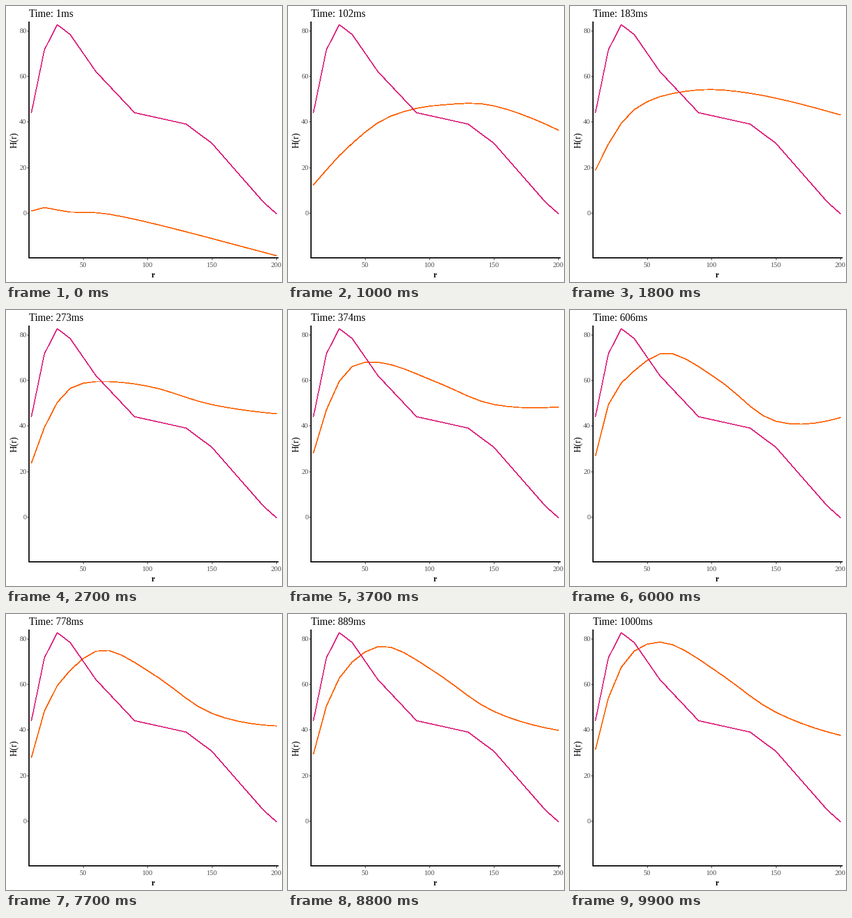
Animation, 480 px wide and 480 px high, one loop 10000 ms. Source, as a matplotlib script:

```python
import numpy as np
import matplotlib.pyplot as plt
from matplotlib.animation import FuncAnimation

SIZE, DPI = 480, 80
FRAMES, INTERVAL = 100, 100
PT = 72 / DPI
SERIF = "Liberation Serif"
PINK, ORANGE, GREY = "#dc267f", "#fe6100", "#4d4d4d"

R = np.arange(10, 201, 10)

# Bends of the fixed curve
REFERENCE = np.interp(R, [10, 20, 30, 40, 60, 90, 130, 150, 190, 200],
                      [44.2, 71.6, 82.6, 78.3, 62, 44, 39, 30.6, 4.8, -.25])

# Moving curve: H at a few radii (columns) and playback times (rows)
KEY_R = [10, 20, 40, 70, 110, 150, 200]
KEY_MS = np.array([0, 1000, 2700, 4600, 6000, 7700, 9900])
KEY_H = [[.9, 2.4, .4, -.5, -5.4, -11.2, -18.7],
         [12.4, 18.9, 30.5, 42.5, 47.4, 47, 36.4],
         [23.8, 39.3, 56.4, 59.4, 56.1, 49.3, 45.3],
         [29.6, 50.3, 69.1, 70.7, 58.8, 47.7, 48.3],
         [26.9, 49.3, 64.1, 71.6, 58.3, 42, 43.6],
         [28, 48.2, 66.1, 74.8, 62.3, 47.2, 41.7],
         [31.5, 54, 74.5, 77.3, 63.3, 47.7, 37.6]]


def smooth(x, knots, values):
    """Cubic Hermite interpolation along the first axis of values."""
    values = np.asarray(values)
    slope = np.gradient(values, knots, axis=0, edge_order=2)
    k = np.clip(np.searchsorted(knots, x, side="right") - 1, 0, len(knots) - 2)
    span = (knots[k + 1] - knots[k])[:, None]
    u = (x - knots[k])[:, None] / span
    ease = u * u * (3 - 2 * u)
    bend = (1 - u) * slope[k] - u * slope[k + 1]
    return (values[k] * (1 - ease) + values[k + 1] * ease
            + span * u * (1 - u) * bend)


def warp(ms):
    """Log time: fast growth at first, slow drift later."""
    return np.log1p(ms / 500)


by_radius = smooth(np.log(R), np.log(KEY_R), np.transpose(KEY_H)).T
CURVES = smooth(warp(np.arange(FRAMES) * INTERVAL), warp(KEY_MS), by_radius)


def px(r):
    return 22 + 2.24 * r


def py(h):
    return 360 - 3.965 * h


fig = plt.figure(figsize=(SIZE / DPI, SIZE / DPI), dpi=DPI, facecolor="white")
ax = fig.add_axes([0, 0, 1, 1])
ax.set_xlim(0, SIZE)
ax.set_ylim(SIZE, 0)
ax.axis("off")


def stroke(x, y, color, width, **kw):
    return ax.plot(x, y, color=color, lw=width * PT, **kw)[0]


def curve(h, color):
    # Hard-edged strokes come out about a pixel wider than their nominal width
    return stroke(px(R), py(h), color, 0.8, antialiased=False)


def label(x, y, text, size, color="black", **kw):
    return ax.text(x, y, text, fontsize=size * PT, color=color,
                   family=SERIF, va="baseline", **kw)


for h in range(0, 81, 20):
    stroke([37, 40], [py(h)] * 2, "#333333", 1)
    label(35.5, py(h) + 4, str(h), 12.5, GREY, ha="right")
for r in range(50, 201, 50):
    stroke([px(r)] * 2, [438, 441], "#333333", 1)
    label(px(r), 453.5, str(r), 12.5, GREY, ha="center")

label(256, 472, "r", 14, ha="center", weight="bold")
label(18.5, 233, "H(r)", 16, ha="center", rotation=90, rotation_mode="anchor")
title = label(40, 19, "", 18)

moving = curve(CURVES[0], ORANGE)
curve(REFERENCE, PINK)
stroke([40, 40, 474], [27, 438, 438], "black", 2, solid_capstyle="butt",
       solid_joinstyle="miter")


def update(i):
    moving.set_ydata(py(CURVES[i]))
    title.set_text(f"Time: {round(1 + 999 * i / (FRAMES - 1))}ms")
    return moving, title


anim = FuncAnimation(fig, update, frames=FRAMES, interval=INTERVAL,
                     repeat=True, repeat_delay=0)
plt.show()
```
